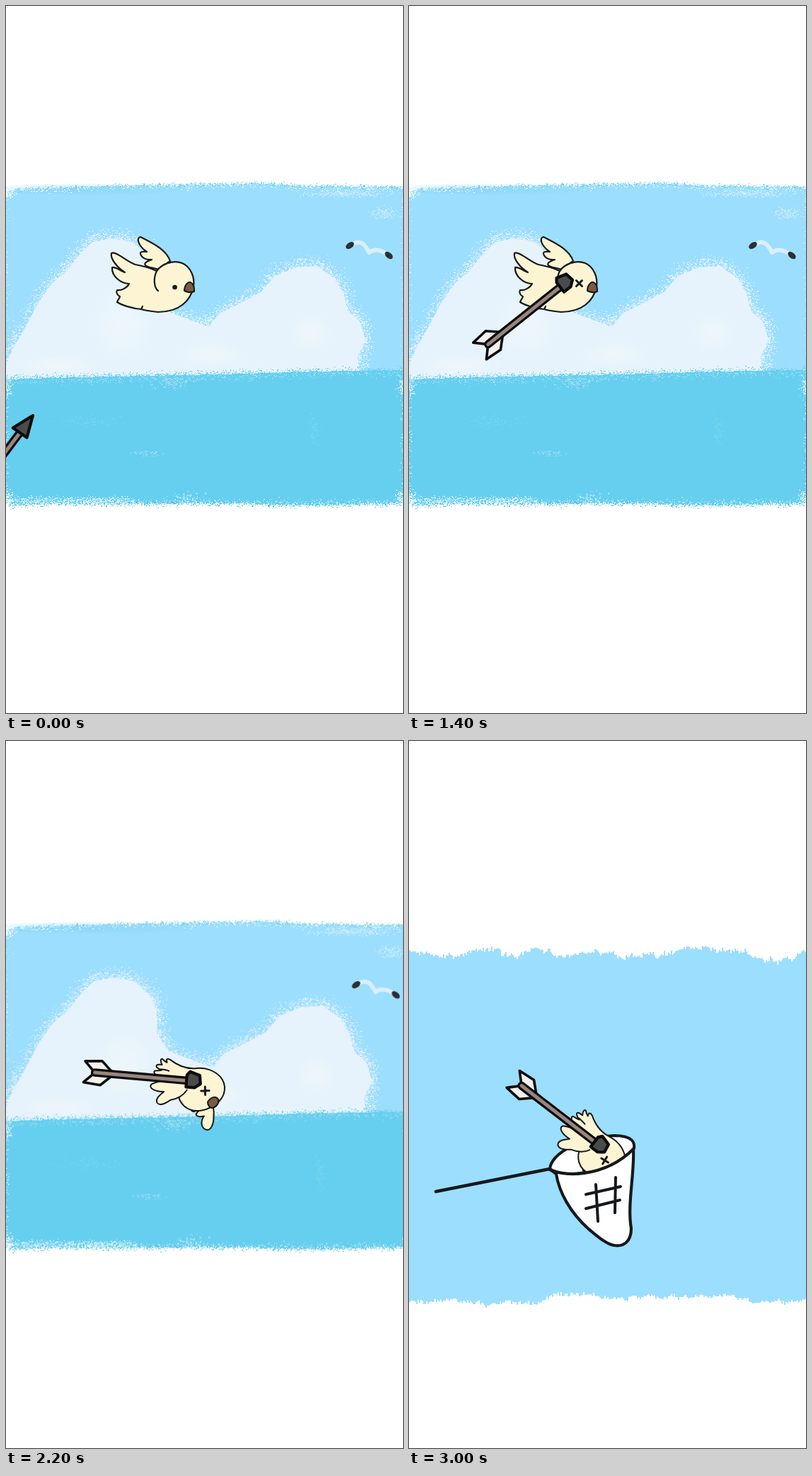
Write an HTML page with a canvas that moves like this. It is 561 by 998 pixels and loops after 3.2 s.

```html
<!DOCTYPE html>
<html>
<head>
<meta charset="utf-8">
<style>
html, body { margin: 0; width: 100%; height: 100%; overflow: hidden; background: #fff; }
canvas { display: block; }
</style>
</head>
<body>
<canvas id="stage" width="561" height="998"></canvas>
<script>
const W = 561, H = 998, STEP = 200;
const SKY = '#9cdefe', SEA = '#66cfef', CLOUD = '#e6f3fc', INK = '#15191b', CREAM = '#fdf4d3';
const ctx = document.getElementById('stage').getContext('2d');

let seed = 1;
const rnd = () => {
  seed = (seed + 0x6D2B79F5) | 0;
  let t = Math.imul(seed ^ (seed >>> 15), 1 | seed);
  t = (t + Math.imul(t ^ (t >>> 7), 61 | t)) ^ t;
  return ((t ^ (t >>> 14)) >>> 0) / 4294967296;
};
const bell = () => rnd() + rnd() + rnd() - 1.5;

// Piecewise linear height through [x, y, x, y, ...]
const profile = p => x => {
  let i = 0;
  while (i < p.length - 4 && x > p[i + 2]) i += 2;
  return p[i + 1] + (p[i + 3] - p[i + 1]) * (x - p[i]) / (p[i + 2] - p[i]);
};

// Torn edge: two layers of random steps over a profile
const torn = (points, amp) => {
  const base = profile(points), coarse = [], fine = [];
  for (let i = 0; i < 300; i++) { coarse.push(bell()); fine.push(bell()); }
  return x => {
    const u = x / 9, i = Math.floor(u), f = u - i;
    return base(x) + amp * (coarse[i] * (1 - f) + coarse[i + 1] * f + 0.8 * fine[x >> 1]);
  };
};

function layer(paint) {
  const c = document.createElement('canvas');
  c.width = W; c.height = H;
  seed = 7;
  paint(c.getContext('2d'));
  return c;
}

function band(g, color, top, bottom) {
  g.fillStyle = color;
  for (let x = 0; x < W; x++) {
    const y = Math.round(top(x));
    g.fillRect(x, y, 1, Math.round(bottom(x)) - y);
  }
}

function specks(g, color, count, place) {
  g.fillStyle = color;
  for (let i = 0; i < count; i++) {
    const [x, y] = place();
    g.fillRect(Math.round(x), Math.round(y), 1 + (rnd() < 0.3), 1);
  }
}

const along = (f, spread, x0 = 0, x1 = W) => () => {
  const x = x0 + rnd() * (x1 - x0);
  return [x, f(x) + bell() * spread];
};
const patch = (x, y, w, h) => () => [x + bell() * w, y + bell() * h];

function blob(g, color, x, y, rx, ry) {
  g.save();
  g.translate(x, y);
  g.scale(rx, ry);
  const fill = g.createRadialGradient(0, 0, 0, 0, 0, 1);
  fill.addColorStop(0, color);
  fill.addColorStop(1, color.slice(0, 7) + '00');
  g.fillStyle = fill;
  g.fillRect(-1, -1, 2, 2);
  g.restore();
}

const topLine = profile([0, 263, 14, 259, 100, 256, 200, 253, 300, 252, 360, 250, 400, 253, 561, 256]);

function paintSky(g) {
  band(g, SKY, x => topLine(x) + bell() * 2, () => 530);
  blob(g, '#86d3f2a0', 110, 259, 160, 9);
  specks(g, SKY, 420, along(topLine, 4));
  specks(g, '#6ccdef', 420, along(topLine, 3));
  specks(g, '#fff', 260, along(x => topLine(x) + 2, 4));
  specks(g, '#cdeefc', 350, patch(480, 264, 60, 6));
  specks(g, '#cdeefc', 160, patch(535, 292, 25, 8));
  specks(g, '#fff', 70, patch(4, 264, 8, 8));
}

const cloudLine = [0, 505, 10, 480, 25, 455, 45, 417, 65, 388, 85, 372, 102, 350, 122, 330, 150, 325,
  178, 330, 200, 350, 209, 370, 210, 403, 226, 427, 260, 440, 287, 450, 302, 431, 330, 417, 360, 401,
  380, 378, 410, 366, 440, 364, 462, 380, 477, 402, 483, 428, 500, 442, 508, 468, 497, 492, 500, 516];

function paintClouds(g) {
  g.fillStyle = CLOUD;
  g.beginPath();
  for (let i = 0; i < cloudLine.length; i += 2) g.lineTo(cloudLine[i], cloudLine[i + 1] + 3);
  g.lineTo(498, 520);
  g.lineTo(0, 530);
  g.fill();
  specks(g, CLOUD, 6500, () => {
    const i = 2 * Math.floor(rnd() * (cloudLine.length / 2 - 1)), t = rnd();
    const mix = k => cloudLine[i + k] * (1 - t) + cloudLine[i + k + 2] * t;
    return [mix(0) + bell() * 14, mix(1) + 3 + bell() * 14];
  });
  for (const [x, y, rx, ry] of [[75, 508, 60, 16], [165, 450, 45, 55], [290, 492, 50, 20], [430, 462, 32, 30]])
    blob(g, '#f0f7fbcc', x, y, rx, ry);
}

function paintGull(g) {
  g.lineCap = g.lineJoin = 'round';
  g.strokeStyle = '#d9effb';
  g.lineWidth = 6;
  g.stroke(new Path2D('M490 336 C502 329 508 338 513 348 C520 342 530 344 539 351'));
  g.fillStyle = '#2b2f30';
  for (const [x, y, a] of [[486, 338, -0.6], [541, 352, 0.7]]) {
    g.beginPath();
    g.ellipse(x, y, 6.5, 4, a, 0, 7);
    g.fill();
  }
}

function paintSea(g) {
  const horizon = profile([0, 527, 100, 524, 300, 520, 480, 515, 561, 514]);
  const shore = profile([0, 705, 60, 703, 300, 702, 400, 705, 561, 703]);
  band(g, SEA, horizon, x => shore(x) + bell() * 2);
  specks(g, SEA, 1500, along(horizon, 6));
  specks(g, '#a5e0f6', 700, along(x => horizon(x) + 3, 7));
  specks(g, '#a5e0f6', 150, patch(235, 531, 35, 9));
  specks(g, '#a0e2f6', 60, patch(198, 631, 18, 4));
  specks(g, '#7fd7f2', 90, patch(115, 587, 50, 9));
  specks(g, '#7fd7f2', 60, patch(435, 598, 8, 20));
  specks(g, '#d9f3fb', 800, along(() => 698, 6, 5, 180));
  specks(g, '#c5ecf8', 350, along(() => 700, 5, 180, 561));
  specks(g, '#c5ecf8', 80, patch(255, 693, 20, 8));
  specks(g, '#4fbfe2', 420, along(shore, 4));
  specks(g, '#fff', 350, along(shore, 4));
  for (const x of [0, 561]) {
    specks(g, '#d9f3fb', 120, patch(x, 535, 8, 14));
    specks(g, '#fff', 160, patch(x, 696, 10, 12));
    specks(g, '#d5f1fb', 260, () => [x + bell() * 4, 260 + rnd() * 440]);
  }
}

const scene = layer(g => {
  paintSky(g);
  paintClouds(g);
  paintSea(g);
  paintGull(g);
});
const closer = layer(g => {
  g.scale(1.018, 1.018);
  g.drawImage(scene, 0, 0);
});
const lowEdge = torn([0, 793, 60, 789, 110, 794, 180, 791, 230, 779, 290, 785, 340, 783, 400, 785, 440, 783, 500, 792, 561, 790], 4);
const highEdge = torn([0, 297, 40, 303, 70, 302, 110, 294, 150, 305, 180, 295, 220, 304, 250, 298, 300, 302, 350, 302,
  400, 294, 450, 294, 520, 311, 561, 300], 5);
const openSky = layer(g => {
  g.save();
  g.scale(1.018, 1.018);
  paintSky(g);
  g.restore();
  band(g, SKY, () => 320, lowEdge);
});
const tornSky = layer(g => band(g, SKY, highEdge, lowEdge));

function draw(path, fill, width = 2.2, stroke = INK) {
  const p = new Path2D(path);
  if (fill) { ctx.fillStyle = fill; ctx.fill(p); }
  if (width) { ctx.lineWidth = width; ctx.strokeStyle = stroke; ctx.stroke(p); }
}

const cross = (x, y) => draw(`M${x - 4} ${y - 4} l8 8 M${x + 4} ${y - 4} l-8 8`, null, 3);

function flyingBird(dead) {
  draw('M232 360 C226 343 207 335 190 326 C184 327 186 338 199 347 C194 346 189 347 190 350 C192 356 199 359 206 358 C200 360 194 363 197 366 C201 370 209 369 215 372 Z', CREAM);
  draw('M213 374 C220 364 236 358 249 363 C261 368 267 383 265 396 C261 416 245 432 215 432 C205 431 196 430 191 428 ' +
    'C178 427 163 422 157 418 C158 414 161 412 161 410 C157 408 155 404 157 401 C163 402 171 398 174 392 ' +
    'C162 392 149 381 150 369 C155 368 162 374 168 376 C158 370 147 357 149 349 C155 345 172 362 183 365 C194 367 204 370 213 374 Z', CREAM);
  draw('M191 428 l2 -4 M213 374 C208 384 209 398 215 402');
  draw('M252 402 C252 394 257 389 261 390 C266 393 266 398 266 403 C261 405 256 404 252 402 Z', '#7b5a40', 2);
  if (dead) cross(240.5, 391.5);
  else draw('M238.5 397 h.1', null, 6.5);
}

// Drawn where the arrow tip is at 267,400
function limpBird() {
  draw('M288 422 C286 432 284 440 286 444 C290 446 294 441 296 438 C297 446 303 453 311 450 C318 447 313 436 307 430 C304 426 301 423 297 420 Z', CREAM, 2);
  draw('M274 440 C276 446 281 446 283 439', CREAM, 2);
  draw('M242 396 C250 387 262 381 275 382 C290 384 297 396 297 408 C296 428 284 446 266 447 C258 447 252 444 249 441 ' +
    'C235 444 215 447 203 442 C198 440 206 436 208 432 C204 434 198 435 198 432 C198 429 202 428 203 426 C198 425 195 421 198 420 ' +
    'C201 420 204 420 206 419 C201 417 202 414 207 413 C218 412 232 408 242 396 Z', CREAM, 2);
  draw('M206 432 C209 430 213 427 216 426', null, 2);
  draw('M228 428 C222 440 212 450 211 457 C212 464 223 460 231 452 C230 460 229 468 235 470 C242 471 244 461 246 454 C251 447 255 438 253 428', CREAM, 2);
  draw('M286 420 C284 412 288 406 294 407 C299 409 300 417 296 422 C293 424 289 423 286 420 Z', '#7b5a40', 2);
  cross(272.5, 411);
}

// Local frame: tip at the origin, shaft along negative x
function arrow(stuck) {
  for (const s of [1, -1])
    draw(`M-160 0 L-175 ${15 * s} L-151 ${17 * s} L-136 ${3 * s} Z`, '#f2f1ee', 3.6, '#0c0c0c');
  draw('M-160 0 L-28 0', null, 11.5, '#0c0c0c');
  draw('M-160 0 L-30 0', null, 5, '#99857f');
  draw(stuck ? 'M-30 -8 L-26 -13 L-12 -9 L-10 3 L-18 9 L-30 9 Z' : 'M0 0 L-31 -12 L-30 12 Z', '#4a4b4b', 4.2, '#0c0c0c');
}

function place(x, y, deg, paint) {
  ctx.save();
  ctx.translate(x, y);
  ctx.rotate(deg * Math.PI / 180);
  paint();
  ctx.restore();
}

function fallenBird(x, y, deg) {
  place(x, y, deg + 38.5, () => {
    ctx.translate(-267, -400);
    limpBird();
  });
  place(x, y, deg, () => arrow(true));
}

function netBack() {
  draw('M38 636 L199 604', null, 4.5);
  draw('M199 605 C200 580 250 558 290 557 C316 557 321 567 317 578 C270 615 215 616 199 605 Z', '#fff', 4);
}
function netFront() {
  draw('M199 604 C214 615 275 618 317 576 C319 610 308 655 314 688 C314 708 302 714 290 712 C278 710 265 698 254 689 C228 666 212 637 208 611 Z', '#fff', 4.2);
  draw('M264 626 L267 678 M292 616 L291 666 M250 640 L299 629 M250 660 L298 648', null, 4);
}

// Arrow tip x, y and heading for each step
const poses = [
  [38, 578, -53], [79, 522, -53], [120, 466, -53], [156, 431, -49], [156, 431, -49], [195, 402, -44],
  [237, 378, -38.5], [237, 378, -38.5],
  [252, 389, -38.5], [267, 400, -38.5], [277, 436, -18], [285, 482, 5], [288, 525, 25.3],
  [286, 540, 37.5], [286, 540, 37.5], [286, 584, 37.5]
];

function frame(now) {
  const step = Math.floor(now / STEP) % poses.length;
  const [x, y, deg] = poses[step];
  ctx.fillStyle = '#fff';
  ctx.fillRect(0, 0, W, H);
  ctx.drawImage(step < 8 ? scene : step < 13 ? closer : step < 14 ? openSky : tornSky, 0, 0);
  ctx.lineCap = ctx.lineJoin = 'round';
  if (step < 8) {
    flyingBird(step === 7);
    place(x, y, deg, () => arrow(step >= 6));
  } else {
    if (step >= 14) netBack();
    fallenBird(x, y, deg);
    if (step >= 14) netFront();
  }
}

const start = performance.now();
(function loop() {
  frame(performance.now() - start);
  requestAnimationFrame(loop);
})();
</script>
</body>
</html>
```
